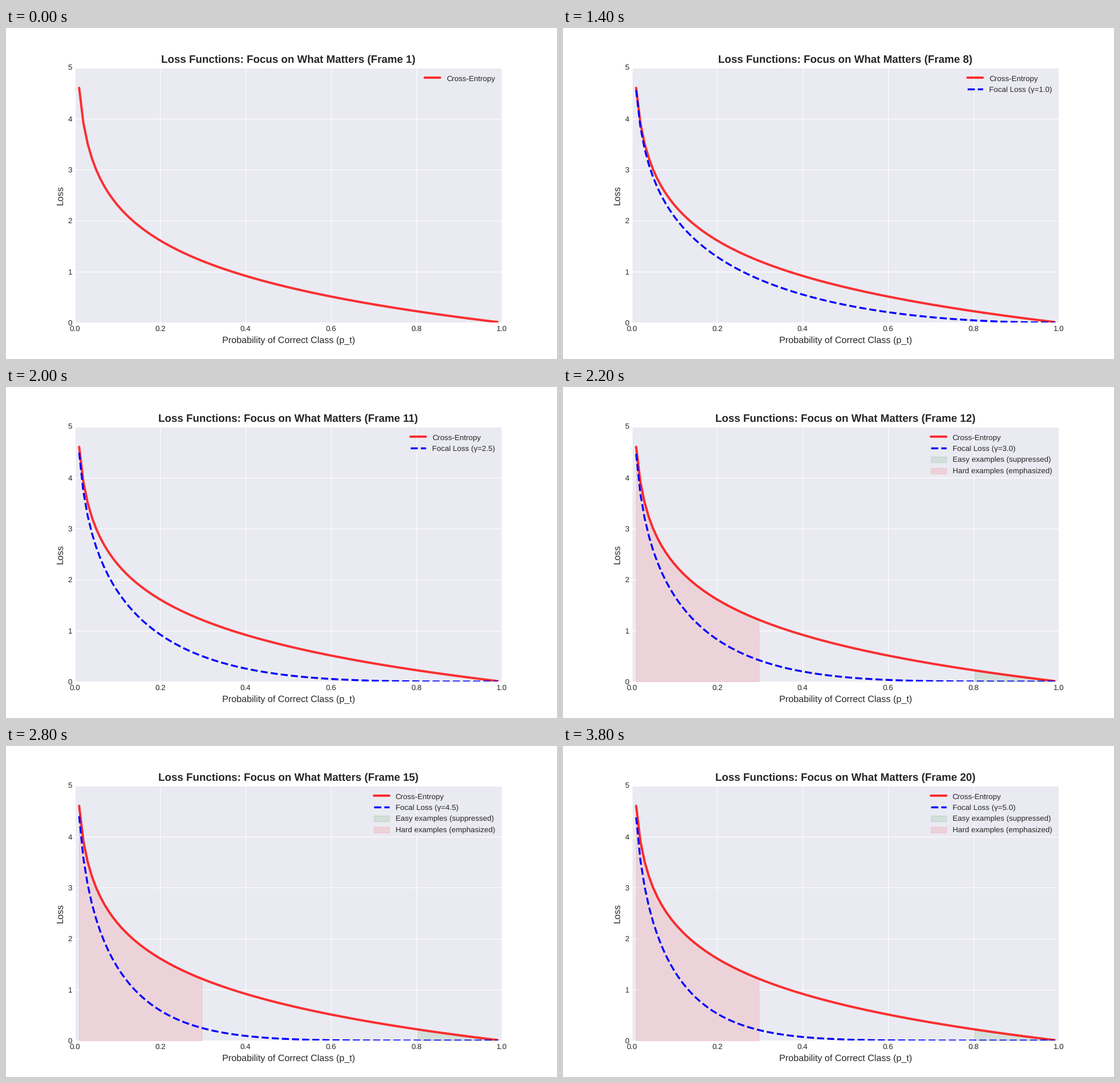
A matplotlib script for the animation above (4000 ms loop, 966x580 px).

```python
import matplotlib.pyplot as plt
import numpy as np
from matplotlib.animation import FuncAnimation
from matplotlib.colors import to_rgb

W, H, DPI = 966, 580, 96.6
FRAMES, INTERVAL = 20, 200
FOCAL_START, SHADE_START = 6, 11
INK, PANEL = "0.15", "#EAEAF2"

plt.rcParams.update({
    "font.family": "Liberation Sans",
    "text.hinting": "none",
    "text.color": INK,
    "axes.labelcolor": INK,
    "axes.facecolor": PANEL,
    "axes.edgecolor": "white",
    "axes.linewidth": 0,
    "axes.axisbelow": True,
    "axes.grid": True,
    "grid.color": "white",
    "grid.linestyle": "-",
    "legend.frameon": False,
    "legend.labelspacing": 0.575,
    "lines.solid_capstyle": "round",
    "xtick.color": INK,
    "ytick.color": INK,
    "xtick.major.size": 0,
    "ytick.major.size": 0,
    "xtick.major.pad": 4.2,
})

p = np.linspace(0.01, 0.99, 100)
cross_entropy = -np.log(p)

# The tiny offset keeps the pixel size from rounding down.
fig, ax = plt.subplots(figsize=((W + 0.01) / DPI, (H + 0.01) / DPI), dpi=DPI)


def shade(mask, color, label, alpha=0.1):
    rgb = np.array(to_rgb(color))
    face = (1 - alpha) * np.array(to_rgb(PANEL)) + alpha * rgb
    ax.fill_between(p[mask], 0, cross_entropy[mask], facecolor=face,
                    edgecolor=(*rgb, alpha), label=label)


def draw(i):
    ax.clear()
    ax.plot(p, cross_entropy, color="red", lw=3, alpha=0.8,
            label="Cross-Entropy")
    if i >= FOCAL_START:
        gamma = min(5.0, 0.5 * (i - FOCAL_START + 1))
        ax.plot(p, (1 - p) ** gamma * cross_entropy, "b--", lw=2.5,
                label=f"Focal Loss (γ={gamma:.1f})")
    if i >= SHADE_START:
        shade(p > 0.8, "green", "Easy examples (suppressed)")
        shade(p < 0.3, "red", "Hard examples (emphasized)")

    ax.set_xlim(0, 1)
    ax.set_ylim(0, 5)
    ax.set_xlabel("Probability of Correct Class (p_t)", fontsize=12,
                  labelpad=4.8)
    ax.set_ylabel("Loss", fontsize=12)
    ax.set_title(f"Loss Functions: Focus on What Matters (Frame {i + 1})",
                 fontsize=14, fontweight="bold")
    ax.legend(loc="upper right", bbox_to_anchor=(1, 0.998))
    return []


anim = FuncAnimation(fig, draw, frames=FRAMES, interval=INTERVAL,
                     init_func=lambda: [], repeat=True)
plt.show()
```
